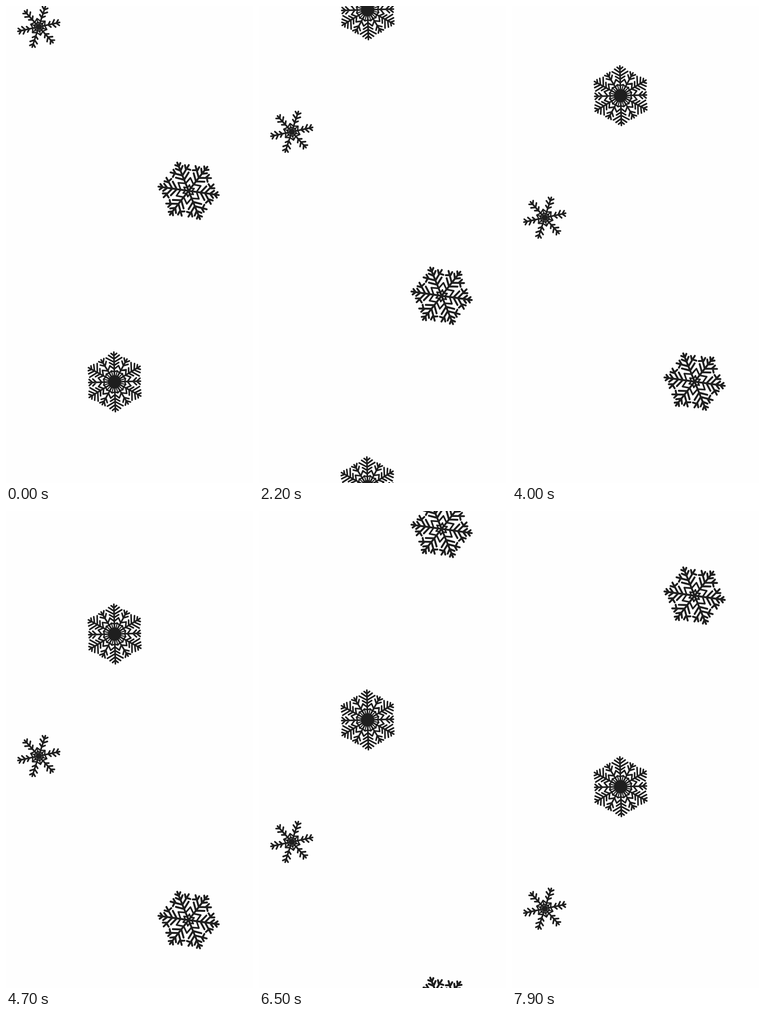
Write an HTML page that moves like this. It is 539 px wide and 1040 px high and loops after 8000 ms.

```html
<!DOCTYPE html>
<html lang="en">
<head>
<meta charset="utf-8">
<title>Falling snowflakes</title>
<style>
  html, body { margin: 0; width: 100%; height: 100%; overflow: hidden; background: #fefefe; }
  svg { display: block; width: 100%; height: 100%; }
  path { fill: none; stroke: #1e1e1e; stroke-linecap: round; stroke-linejoin: round; }
  circle { fill: #1e1e1e; }
</style>
</head>
<body>
<svg viewBox="0 0 539 1040">
  <g id="fall">
    <g id="snow"></g>
    <use href="#snow" y="-1040"/>
  </g>
</svg>
<script>
const LOOP = 8000, STEP = 100, DROP = 10.4;

// Arms are drawn along +x, then repeated around the centre.
const line = (a, b) => `M${a} 0H${b}`;
const vee = (root, end, w) => `M${end} ${-w}L${root} 0L${end} ${w}`;
const path = (d, width) => `<path d="${d}" stroke-width="${width}"/>`;
const ring = (n, shape, turn = 0) => Array.from({ length: n }, (_, i) =>
  `<g transform="rotate(${turn + i * 360 / n})">${shape}</g>`).join('');

// Star outline with its notches on the arms and its points between them.
function star(n, outer, inner, width) {
  const pts = Array.from({ length: 2 * n }, (_, i) => {
    const a = i * Math.PI / n, r = i % 2 ? outer : inner;
    return (r * Math.cos(a)).toFixed(2) + ' ' + (r * Math.sin(a)).toFixed(2);
  });
  return path('M' + pts.join('L') + 'Z', width);
}

const flake = (x, y, turn, art) =>
  `<g transform="translate(${x} ${y}) rotate(${turn})">${art}</g>`;

const small =
  ring(6, path(line(0, 46.5) + vee(39, 44.5, 6) + vee(30, 36, 8) + vee(21, 26, 6), 3.6)) +
  ring(6, path(line(0, 17), 2.4), 30) +
  star(6, 18.5, 13, 3) + star(6, 11.5, 8, 2.4) + '<circle r="5.5"/>';

// Side branch with a twig on either side.
const branch = s => `M36 0L52 ${s * 21.5}M45 ${s * 12}L55 ${s * 13.5}M46.5 ${s * 14}L41 ${s * 20.5}`;
const large =
  ring(6, path(line(0, 66.5) + vee(57, 63, 6) + vee(47, 55, 8) + vee(26, 37, 15) +
    branch(1) + branch(-1), 4.2)) +
  star(6, 28.5, 17.5, 3.6) + star(6, 13, 7, 3.2);

const round =
  ring(6, path(line(12, 65) + vee(57, 62, 6) + vee(50, 58, 11.5) + vee(43, 52.5, 17) +
    vee(36, 42, 10), 3.5)) +
  ring(6, path(line(12, 56.5) + vee(48, 55.5, 6.5) + vee(40, 47.5, 7.5), 3.5), 30) +
  star(12, 36.5, 28, 3.4) + star(12, 25, 22, 3) +
  ring(24, path(line(13, 23), 2.4)) + '<circle r="14.5"/>';

document.getElementById('snow').innerHTML =
  flake(71.5, 45.5, -12, small) +
  flake(398.5, 403, 8, large) +
  flake(237, 819.5, -91.5, round);

const fall = document.getElementById('fall');
function draw() {
  const step = Math.floor(performance.now() % LOOP / STEP);
  fall.setAttribute('transform', `translate(0 ${(step * DROP).toFixed(1)})`);
  requestAnimationFrame(draw);
}
draw();
</script>
</body>
</html>
```
